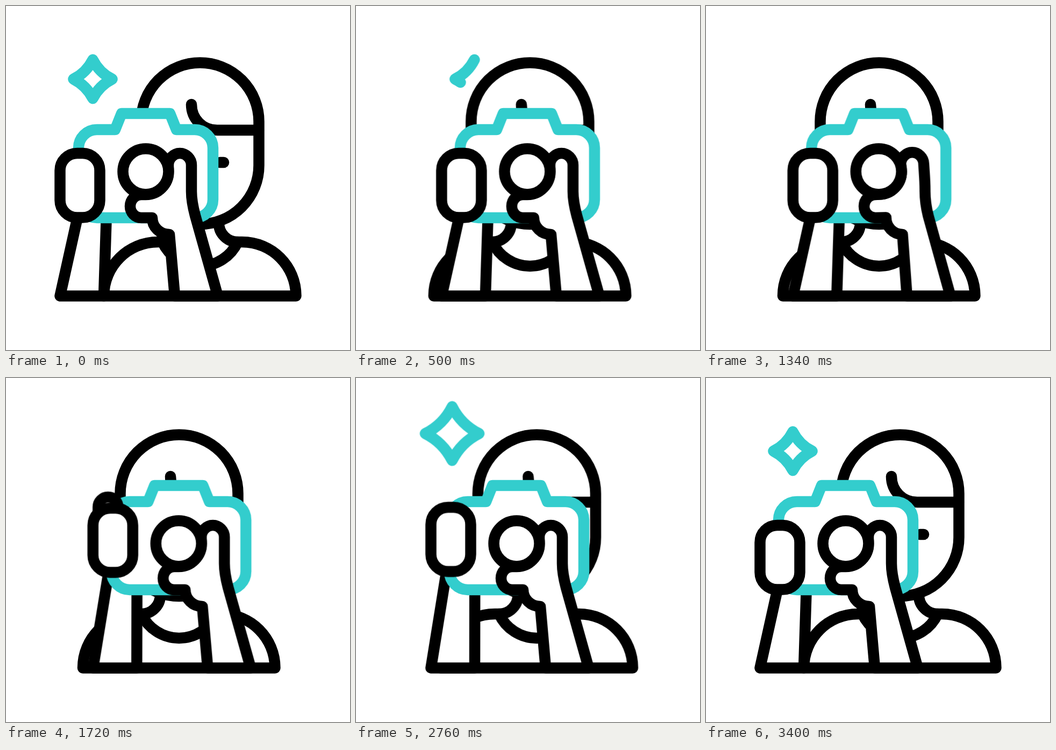
Write an HTML page that moves like this. It is 640 px wide and 640 px high and loops after 3600 ms.

```html
<!DOCTYPE html>
<html lang="en">
<head>
<meta charset="utf-8">
<title>Photographer</title>
<style>
html, body { margin: 0; width: 100%; height: 100%; overflow: hidden; background: #fff; }
svg { display: block; width: 100%; height: 100%; }
svg * {
  animation: 3600ms cubic-bezier(.333, 0, .333, 1) infinite;
}
.ink { fill: #fff; stroke: #000; stroke-width: 20.5; stroke-linecap: round; stroke-linejoin: round; }
.teal { stroke: #33cdcd; }
.line { fill: none; }

.person { animation-name: person; }
.camera { animation-name: camera; }
.lift { animation-name: lift; }
.finger { animation-name: finger; }
.arm { animation-name: arm; }
.hand { animation-name: hand; }
.drift { animation-name: drift; }
.star { animation-name: star, trim, weight; }

@keyframes person {
  0%, 94.44%, 100% { transform: none; }
  17.8%, 68.7% { transform: translateX(-39px); }
}
@keyframes camera {
  0%, 94.44%, 100% { transform: none; }
  17.8%, 68.7% { transform: translateX(61.3px); }
}

/* left hand reaches up to the shutter */
@keyframes lift {
  0%, 39.75%, 94.44%, 100% { transform: none; }
  55.3%, 71.1% { transform: translateY(-43px); }
}
@keyframes arm {
  0%, 39.75%, 94.44%, 100% { d: path("M131.5 400 L100.5 539.5 H182 L186.5 400"); }
  55.3%, 71.1% { d: path("M127.5 357 L100.5 539.5 H182 L181 357"); }
}
@keyframes finger {
  0%, 39.75%, 76%, 100% { transform: translateY(20px); }
  55.3%, 68.9% { transform: translateY(-35px); }
}

/* right hand turns the lens */
@keyframes hand {
  0%, 15%, 40.5%, 100% {
    d: path("M302 308 L302 296 C302 284 312 274 323.5 274 C335 274 345 284 345 296 C345 312 345 329 345 345 C345 360 348 375 352 390 L394 539.5 L314 539.5 L304 425 C286 425 272 411 272 394 L252 394 C240 394 231 384 231 372.5 C231 361 240 351 252 351 L260 351 C283 351 302 332 302 308 Z");
  }
  26.7%, 28.3% {
    d: path("M307 308 L287 268 C285 258 294 247 306 247 C315 247 320 250 326 257 C340 271 366 300 363 324 C362 330 355 385 355 398 L386 539.5 L292 539.5 L308 424 C299 420 294 404 296 387 L279 393 C267 391 259 382 259 372 C259 362 264 357 274 352 L296 340 C303 334 307 320 307 308 Z");
  }
}

/* sparkle: wiped away, then pops out of the flash */
@keyframes drift {
  0%, 57.8%, 94.44%, 100% { transform: none; }
  71.7%, 73.9% { transform: translate(-23px, -35px); }
}
@keyframes star {
  0%, 21.94%, 94.44%, 100% { d: path("M0 -36 Q-12 -12 -36 0 Q-12 12 0 36 Q12 12 36 0 Q12 -12 0 -36"); }
  21.95%, 57.8% { d: path("M0 -1 Q-.3 -.3 -1 0 Q-.3 .3 0 1 Q.3 .3 1 0 Q.3 -.3 0 -1"); }
  71.7%, 73.9% { d: path("M0 -51 Q-17 -17 -51 0 Q-17 17 0 51 Q17 17 51 0 Q17 -17 0 -51"); }
}
@keyframes trim {
  0% { stroke-dasharray: 101 300; animation-timing-function: cubic-bezier(.333, 0, .667, 1); }
  21.94% { stroke-dasharray: 0 300; }
  21.95%, 100% { stroke-dasharray: 101 300; }
}
@keyframes weight {
  0%, 21.94%, 62%, 100% { stroke-width: 20.5; }
  21.95%, 57.8% { stroke-width: 0; }
}
</style>
</head>
<body>
<svg viewBox="0 0 640 640">
  <g class="person ink">
    <path d="M182 539.500 C182 484 227 439 283 439 H291 A35 35 0 0 0 326 403 H396 A35 35 0 0 0 431 439 H439 C495 439 539.500 484 539.500 539.500 Z"/>
    <path class="line" d="M291 439 A77 77 0 0 0 431 439"/>
    <rect x="251.500" y="105.500" width="219" height="300.500" rx="109.500"/>
    <path class="line" d="M345 183 C345 210 366 231 393 231 H470"/>
    <path class="line" d="M398 291 H405"/>
  </g>
  <g class="camera ink">
    <path class="arm" d="M131.500 400 L100.500 539.500 H182 L186.500 400"/>
    <path class="teal" d="M169 230 H203 L215 200 H305 L317 230 H351 A34 34 0 0 1 385 264 V360 A34 34 0 0 1 351 394 H169 A34 34 0 0 1 135 360 V264 A34 34 0 0 1 169 230 Z"/>
    <path class="hand" d="M302 308 L302 296 C302 284 312 274 323.500 274"/>
    <circle cx="260" cy="308" r="42.500"/>
    <g class="lift">
      <path class="finger" d="M110 335 V292.500 A18.500 18.500 0 0 1 147 292.500 V335"/>
      <rect x="100.500" y="274" width="74" height="119.500" rx="32"/>
    </g>
    <g class="drift">
      <g transform="translate(161.500 136)">
        <path class="star teal line" pathLength="100" d="M0 -36 Q-12 -12 -36 0 Q-12 12 0 36 Q12 12 36 0 Q12 -12 0 -36"/>
      </g>
    </g>
  </g>
</svg>
</body>
</html>
```
